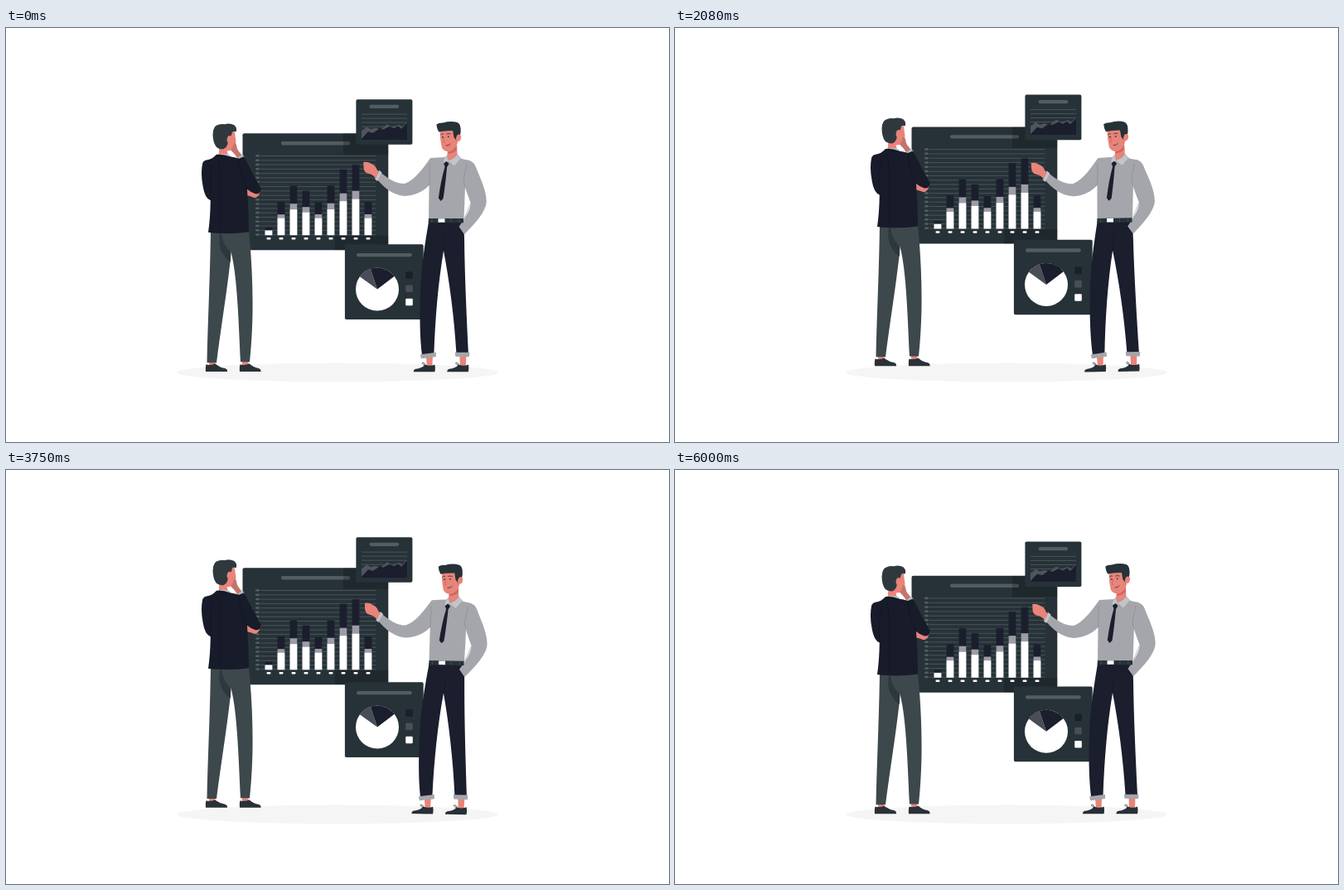
Recreate the animation shown at these times as an HTML page. Size 800x500 px, loop 6040 ms.

```html
<!DOCTYPE html>
<html lang="en">
<head>
<meta charset="utf-8">
<title>Data presentation</title>
<style>
  html, body { margin: 0; width: 100%; height: 100%; overflow: hidden; background: #fff; }
  svg { display: block; width: 100%; height: 100%; }
  .slate { fill: #263238; }
  .navy { fill: #1a1e2d; }
  .grey { fill: #a5a6ab; }
  .skin { fill: #e8847a; }
  .label { fill: #525c61; }
  .rule { stroke: #525c61; stroke-width: .8; }
  .crease { fill: none; stroke: #7f8187; stroke-width: .5; }
  .seam { fill: none; stroke: #10131f; stroke-width: .5; }
  .ink { fill: none; stroke: #263238; stroke-width: .8; stroke-linecap: round; }
</style>
</head>
<body>
<svg viewBox="0 0 800 500">
  <ellipse cx="400" cy="416" rx="194" ry="11.4" fill="#f5f5f5"/>

  <g id="board">
    <rect class="slate" x="285.5" y="127.7" width="175.8" height="141" rx="2"/>
    <rect class="label" x="332" y="137.5" width="83" height="4.4" rx="2"/>
    <g id="grid"></g>
    <path d="M407 127.700H461.300V153.200H407ZM397 251.200H461.300V268.700H397Z" opacity=".2"/>
    <g id="bars"></g>
  </g>

  <g id="cards">
    <rect class="slate" x="422.4" y="86.4" width="68" height="54.7" rx="1.8"/>
    <rect class="label" x="438.5" y="92.9" width="35.8" height="4.3" rx="2.1"/>
    <g id="cardRules"></g>
    <path fill="#50555d" d="M429 135.300V125L435 119.500 440 122.500 446 121 452 123 460 116.500 466 120 474 117 478 119.500 484 113.500V135.300Z"/>
    <path class="navy" d="M429 135.300V134L437 125.500 443 127 451 121.500 455 123 463 119 468 121.500 473 118.500 477 122 484 114.500V135.300Z"/>

    <rect class="slate" x="408.9" y="261.6" width="94.8" height="90.6" rx="1.8"/>
    <rect class="label" x="423" y="272.2" width="66.8" height="4.4" rx="2.1"/>
    <circle cx="448" cy="315.8" r="26" fill="#fff"/>
    <path fill="#4a4c57" d="M448 315.800L426.900 300.600A26 26 0 0 1 439.800 291.100Z"/>
    <path class="navy" d="M448 315.800L439.800 291.100A26 26 0 0 1 468.700 300.100Z"/>
    <rect class="navy" x="482.2" y="294.4" width="8.6" height="8.6" rx="1.3"/>
    <rect fill="#4a4e57" x="482.2" y="310.7" width="8.6" height="8.6" rx="1.3"/>
    <rect fill="#fff" x="482.2" y="327" width="8.6" height="8.6" rx="1.3"/>
  </g>

  <g id="thinker">
    <path class="skin" d="M245 402H252.500L252 408H245ZM285 402H292.500L292 408H285Z"/>
    <path fill="#2a3237" d="M241.500 406.500Q247 408 252.500 405.500Q257 410 265 411.300Q267.500 412.300 267 415.200H241Q240.500 410 241.500 406.500ZM282.500 406.500Q288 408 293.500 405.500Q298 410 305.500 411.300Q308 412.300 307.500 415.200H282Q281.500 410 282.500 406.500Z"/>
    <path fill="#3d484c" d="M247 245H271L270.500 283C266 322 259 365 254 404.300H242.500C243.500 355 246.300 300 247 245Z"/>
    <path fill="#3d484c" d="M258 245H293C296 275 298 310 297.500 345C297 370 295.500 390 294 403.500H283C281 365 279.500 300 271.500 271Q262 263 258 249Z"/>
    <path fill="#2e383c" d="M258 248Q255.500 262 261 272Q265 279 270.800 283L271.500 271Q262 263 260 249Z"/>
    <path class="skin" d="M290.500 194L307.500 195.500Q305.500 204.500 300 205.300Q295 203 291 202.500Z"/>
    <path class="skin" d="M266 126L276 125.500Q276.500 131 277.500 137Q277 144 273 146.500Q270 149 266.500 148.500Q268 152 267.500 155H256.500L257.500 143Z"/>
    <path fill="#c4756b" d="M271 147.500Q274 144.500 274.800 139.500Q277.500 138 278.200 142Q278.500 147 282 150.500L285.500 155L280 159Q277 153 271 147.500Z"/>
    <path fill="#b9bbc1" d="M279.500 157L285.500 152.500L288 157L282 161ZM254 154Q262 150 270 153.500L272 157H253Z"/>
    <path fill="#2f393d" d="M250.500 137Q248 125 252 119.500Q257 115 264 116.300Q270 114.500 275.500 117.300Q279.500 121 277.500 125.500Q274 124.500 272.800 126.500L271.500 131L268 132L267.500 140Q266 145 262 146.500Q256 146.500 253.500 143.500Q251.500 141 250.500 137Z"/>
    <ellipse class="skin" cx="269.500" cy="134.300" rx="2.800" ry="4.200" transform="rotate(12 269.500 134.300)"/>
    <path fill="#171b2a" d="M254 153Q262 152 270 155.500Q276 156 281 158L287 155.500Q292 164 297 175Q303 185 307.800 194.500Q307.500 201 301 200.500Q295 198.500 291 195L292.500 222L293 246.500Q268 250 244 247Q246.500 230 246.800 208.500Q240 206 237.700 192Q234.500 176 237.200 163.500Q238.500 160 243 159.500Q249 158.500 254 153Z"/>
    <path class="seam" d="M248 166Q246 190 247 208M281 158Q282 178 291 195M257 160Q259 205 258.500 245M254 154Q262 156 270 156"/>
  </g>

  <g id="speaker">
    <path class="skin" d="M507 396H515L514.500 409H508ZM547.500 395H555.500L555 409H548Z"/>
    <path fill="#263036" d="M517.500 406.500Q518.500 411 517.500 415.300H492Q491.500 412.500 494.500 411.800Q502 411 506 406.500Q512 409 517.500 406.500ZM558 406.500Q559 411 558 415.300H532.500Q532 412.500 535 411.800Q542.500 411 546.500 406.500Q552.500 409 558 406.500Z"/>
    <path class="ink" d="M505.500 408Q501 405 503 404Q505.500 404 506 407.500M546 408Q541.500 405 543.500 404Q546 404 546.500 407.500"/>
    <path class="navy" d="M510 234H552L553 254C553.500 300 556 350 558 392.500H543.500C541 350 535 305 528 269C521.500 308 518 350 516.500 394H502C499 370 498.800 335 501 300C503 275 507 252 510 234Z"/>
    <path class="seam" d="M528 269L530 250M546 238Q547 246 553 250"/>
    <path class="grey" d="M500 394.300L519 391.800L519 397L501 399.300ZM541.800 391.700H559.500L559 397.300L542.500 396.800Z"/>
    <path class="grey" d="M512 157Q520 156.500 530 156L546 157Q553 159 560 160L554 190L552.500 231H510L510.500 190C504 197 494 202.500 481 203C467 202 456 193 446 181L451.500 174C461 182 470 188 481 188C494 183 504 168 512 157Z"/>
    <path class="grey" d="M553 161C562 158 566 164 568 171C573 183 579.700 197 579.700 210C579 222 566 236 553 249.300L546.500 240C553 231 560 221 561 211C557 200 552 188 552 178Z"/>
    <path class="crease" d="M556 164Q553 176 552 185Q556 199 561 211L553 230M511 164Q512 175 510.500 190"/>
    <path fill="#c3c4c9" d="M450 171.800L453.500 174.500L448 185L445 182.500Z"/>
    <path class="skin" d="M431.200 162Q436 161 441 164Q446 166 447.500 171L450 174L446 181.500Q443 177 438 176Q432 175 431.500 169Z"/>
    <path class="skin" d="M533 146L544 141L544.500 154Q541 161 535.500 160L532 156Z"/>
    <path fill="#cc695f" d="M533 149Q540 148 543.500 142L543.800 147Q539 152 533 151.500Z"/>
    <path class="skin" d="M523.800 122H545V138Q542.500 147 535.500 149.300Q529 150 526 145Q523.300 135 523.800 122Z"/>
    <path class="slate" d="M519.300 116.500Q522 114.300 527 114.500Q537 111.700 545 114.200Q549 116 548.500 126L547.500 131L543.500 136L540.300 132L539 124Q530 123.500 522 125.500Q519.500 121 519.300 116.500Z"/>
    <ellipse class="skin" cx="546" cy="132.700" rx="2.900" ry="4.200" transform="rotate(15 546 132.700)"/>
    <path class="ink" d="M524.500 128.800Q526 127.300 527.500 128M531.500 128Q533.500 126.700 536 128M531 142Q534 142.500 536 140"/>
    <path fill="none" stroke="#c55f58" stroke-width=".7" d="M528.500 132L527.500 138L529.500 138.500"/>
    <g class="slate"><circle cx="526.800" cy="131.800" r=".9"/><circle cx="533.700" cy="131.300" r=".9"/></g>
    <path fill="#c3c4c9" stroke="#8c8e94" stroke-width=".4" d="M532 154L528 158L527 165L533.500 161L541 167L549 157.500L544.500 152.500Q541 158 534 160Z"/>
    <path class="navy" d="M528 163.500L531.500 161L534.500 164L532 168Q530 190 527.500 206L524.500 209L521.800 205.500Q524.500 185 529.500 167.500Z"/>
    <path class="slate" d="M510 230H552V235.300H509.500Z"/>
    <path fill="#fff" d="M521.500 230.200H529.500V234.800H521.500Z"/>
    <path stroke="#4c565a" stroke-width=".7" d="M514 230V235M537 230V235M547 230V235"/>
  </g>
</svg>
<script>
const $ = id => document.getElementById(id);
const SVG = 'http://www.w3.org/2000/svg';

function add(parent, tag, attrs) {
  const el = document.createElementNS(SVG, tag);
  for (const key in attrs) el.setAttribute(key, attrs[key]);
  $(parent).append(el);
}
const rule = (parent, x1, x2, y) => add(parent, 'line', { class: 'rule', x1, x2, y1: y, y2: y });

// Chart grid with its scale labels
for (let i = 0; i < 19; i++) {
  const y = 155 + i * 5.29;
  rule('grid', 307, 446.5, y);
  add('grid', 'rect', { class: 'label', x: 301, y: y - 1.4, width: 5, height: 2.5, rx: 1 });
}
for (let i = 0; i < 5; i++) rule('cardRules', 429, 484, 104.4 + i * 5);

// Tops of the dark, grey and white part of each bar
const base = 250.7;
const tops = [
  [241.2, 244.7, 245.2], [210.5, 225.7, 230.2], [191.2, 212.7, 219.7],
  [197.2, 216.7, 223.2], [211.2, 225.5, 230.2], [191.2, 212.2, 219.5],
  [171.2, 200.2, 209.7], [165.7, 197.2, 207.2], [210.7, 225.5, 230.2]
];
const shades = ['#1a1e2d', '#9d9ca7', '#fff'];
tops.forEach((levels, i) => {
  const x = 312.6 + i * 15;
  levels.forEach((y, n) => add('bars', 'rect', { x, y, width: 8.7, height: base - y, fill: shades[n] }));
  add('bars', 'rect', { x: x + 1.9, y: 253.5, width: 5, height: 2.6, rx: 1, fill: '#fff' });
});

const LOOP = 6040, STEP = 1000 / 24, LEAD = 38;

// Linear rise of 10 px and back
function floatY(t, period) {
  const p = (t % period) / period;
  return -10 * (1 - Math.abs(1 - 2 * p));
}

// Linear sway: 0 to 1 degree, to -1 degree, back to 0
function sway(t, period) {
  const p = (t % period) / period;
  return p < .25 ? 4 * p : p < .75 ? 2 - 4 * p : 4 * p - 4;
}

function draw() {
  const now = performance.now() % LOOP;
  const t = Math.min(Math.floor((now + 5) / STEP) * STEP + LEAD, 6000);
  const move = (id, value) => $(id).setAttribute('transform', value);
  move('board', `translate(0 ${floatY(t, 1500)})`);
  move('cards', `translate(0 ${floatY(t, 3000)})`);
  move('thinker', `translate(0 ${floatY(t, 6000)})`);
  move('speaker', `rotate(${sway(t, 3000)} 505 265)`);
  requestAnimationFrame(draw);
}
draw();
</script>
</body>
</html>
```
